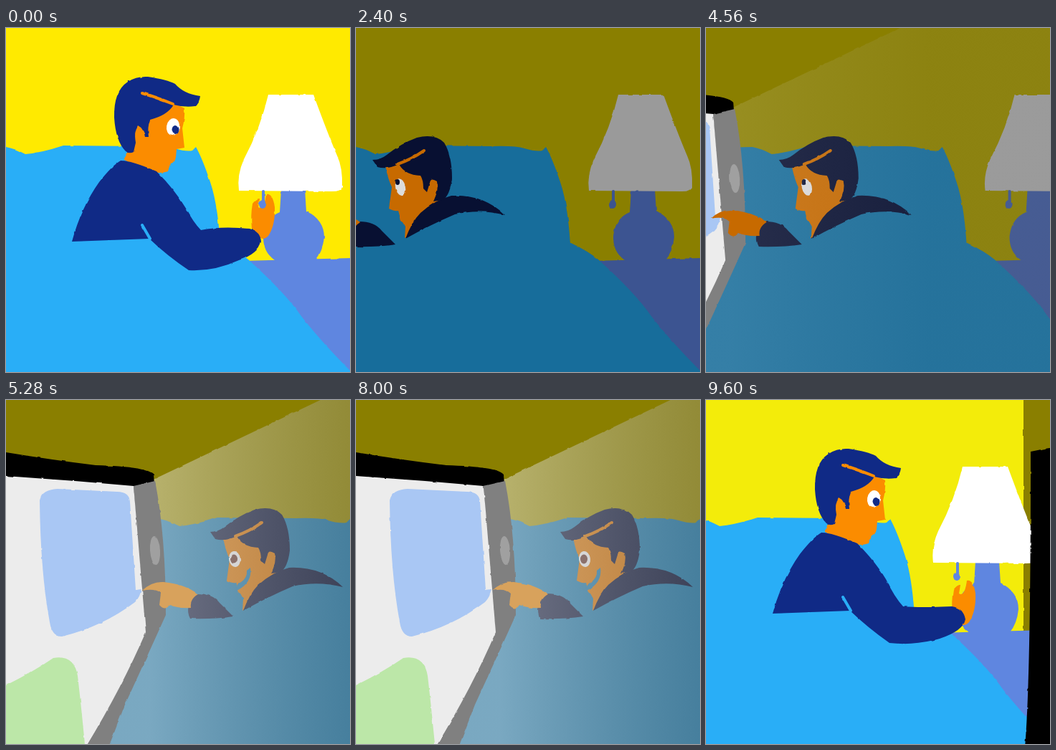
Animation, 480 px wide and 480 px high, one loop 9680 ms. Source, as an HTML page:

```html
<!DOCTYPE html>
<html lang="en">
<head>
<meta charset="utf-8">
<title>Lights out</title>
<style>
html, body { margin: 0; width: 100%; height: 100%; overflow: hidden; background: #8a7f00; }
svg { display: block; width: 100vw; height: 100vh; }
.lit { --wall: #ffea00; --bed: #29aef7; --navy: #102a86; --skin: #fb8c00; --shade: #fff; --base: #5f86e0; --eye: #fff; }
.dim { --wall: #8a7f00; --bed: #176d9b; --navy: #081032; --skin: #c76a00; --shade: #9a9a9a; --base: #3c5491; --eye: #dcdcdc; }
.wall { fill: var(--wall); }
.bed { fill: var(--bed); }
.navy { fill: var(--navy); }
.skin { fill: var(--skin); }
.shade { fill: var(--shade); }
.base { fill: var(--base); }
.eye { fill: var(--eye); }
.line { fill: none; stroke-width: 4; stroke-linecap: round; }
.line.skin { stroke: var(--skin); }
.line.bed { stroke: var(--bed); }
.line.base { stroke: var(--base); }
</style>
</head>
<body>
<svg viewBox="0 0 480 480" preserveAspectRatio="none">
  <defs>
    <filter id="boil" filterUnits="userSpaceOnUse" x="-10" y="-10" width="500" height="500" color-interpolation-filters="sRGB">
      <feTurbulence id="noise" type="fractalNoise" baseFrequency=".08" numOctaves="2" seed="1"/>
      <feDisplacementMap in="SourceGraphic" scale="2.5" xChannelSelector="R" yChannelSelector="G"/>
    </filter>
    <linearGradient id="beam" gradientUnits="userSpaceOnUse" x1="200" y1="0" x2="480" y2="0">
      <stop offset="0" stop-color="#eee" stop-opacity=".46"/>
      <stop offset="1" stop-color="#a2a2a2" stop-opacity=".34"/>
    </linearGradient>
  </defs>
  <g id="stage" filter="url(#boil)"></g>
</svg>
<script>
const LOOP = 9680, STEP = 80;
const $ = id => document.getElementById(id);
const path = (cls, d, id = '') => `<path id="${id}" class="${cls}" d="${d}"/>`;
const oval = (cls, x, y, rx, ry, turn = 0) =>
  `<ellipse class="${cls}" cx="${x}" cy="${y}" rx="${rx}" ry="${ry}" transform="rotate(${turn} ${x} ${y})"/>`;
const group = (id, body, cls = '') => `<g id="${id}" class="${cls}">${body}</g>`;

const room =
  path('base', 'M330 325L482 321V500H330Z') +
  path('base', 'M384 225H417L419 255Q444 268 444 292Q442 312 432 324H375Q358 312 359 290Q362 265 382 257Z') +
  path('shade', 'M366 93L429 93Q450 150 462 178Q470 195 469 222Q468 228 455 228L325 227Q322 205 332 183Q355 140 366 93Z') +
  path('bed', 'M-185 170L0 166Q12 168 27 176Q50 174 80 164L190 165Q222 164 235 168Q252 173 260 171L265 166Q274 182 285 215Q297 250 300 320H-185Z');

const blanket = path('bed', 'M-185 300H300Q325 312 338 323Q390 370 412 402Q440 438 482 480V500H-185Z');

const cord = path('line base', 'M359 228V244') + oval('base', 358, 246, 5, 6);

const armUp = 'M160 185Q175 185 210 200Q235 225 250 250Q262 272 272 282Q300 276 340 280Q355 284 356 298Q352 315 325 324Q290 340 255 338Q225 318 200 294L92 298Q105 250 130 215Q148 192 160 185Z';
const armDown = 'M160 185Q175 185 210 200Q235 225 250 250Q262 275 274 288Q300 290 342 288Q358 290 361 306Q358 322 325 333Q290 343 255 339Q225 318 200 294L92 298Q105 250 130 215Q148 192 160 185Z';

const upright = id =>
  group(id + 'Hand', path('skin', 'M343 280Q341 262 344 245Q350 237 354 238L352 250Q360 255 363 232Q372 230 375 250Q376 275 366 290Q358 298 352 290Z')) +
  path('skin', 'M176 150L190 100L235 105L249 112Q250 125 246 140L249 167L238 169L237 180Q236 188 229 190L226 200Q215 204 200 200L164 184L172 170Z') +
  path('navy', 'M151 125Q150 88 170 75Q182 67 198 68Q225 72 236 78Q248 92 271 95Q270 104 264 109Q248 111 234 107Q225 122 201 128Q197 138 199 152L194 152Q192 140 184 136Q178 145 181 160L178 173Q172 176 167 172Q153 158 151 125Z') +
  path('line skin', 'M190 91Q210 97 233 106') +
  oval('eye', 233, 138, 9, 12, 10) + oval('navy', 236, 142, 4.5, 6) +
  path('navy', armUp, id + 'Torso') +
  path('line bed', 'M190 275L201 294');

const turning =
  path('skin', 'M207 307L221 288Q235 277 245 280Q249 285 240 292Q228 297 216 306Z') +
  path('navy', 'M92 232Q95 210 125 207Q140 205 150 199L180 193Q190 160 215 150Q226 143 255 158L262 178Q280 186 284 195Q265 202 255 196L240 190L222 205L224 240L223 273L207 265Q215 275 223 290Q215 305 200 307Q175 307 150 290Q125 270 100 262Q92 250 92 232Z') +
  path('navy', 'M96 275Q100 265 112 267L125 277Z') +
  path('skin', 'M211 198Q220 186 221 205Q228 200 232 190L249 196L249 212L252 233L239 234L236 245L225 252L222 225Q211 215 211 198Z') +
  path('line skin', 'M225 159Q240 168 251 182') +
  path('line bed', 'M139 208Q160 209 184 212M146 223Q175 247 205 268') +
  oval('eye', 243, 208, 5, 8) + oval('navy', 243, 212, 4, 4);

const pointing = '<path d="M190 266Q203 253 220 254Q250 257 268 271Q256 278 258 290Q240 291 228 286Q222 295 214 286L216 270Q208 262 190 266Z"/>';

const lying =
  path('navy', 'M266 270Q288 270 298 283L317 302Q290 306 257 305Q248 288 266 270Z') +
  path('skin', 'M303 193Q307 212 312 222L308 252Q316 256 321 255L323 262Q322 268 327 270L331 277L330 294L380 245L379 200L340 180Z') +
  path('navy', 'M331 294Q340 270 352 258Q372 240 395 234Q440 232 470 261Q435 252 400 260Q365 275 331 294Z') +
  path('navy', 'M285 184Q296 184 305 177Q325 161 347 153Q372 147 385 160Q396 178 396 210Q393 234 383 240L370 242Q378 225 375 214Q366 208 365 216L361 229L356 224Q356 212 352 206Q330 205 322 190Q305 198 292 194Z') +
  path('line skin', 'M320 190Q340 183 357 171') +
  group('awake', oval('eye', 324, 222, 7, 12, -12) + oval('navy', 320, 215, 3, 4)) +
  group('happy', oval('eye', 319, 222, 8, 11, -8) + '<ellipse cx="318" cy="222" rx="5" ry="6.5" fill="#5c3028"/>' +
    path('bed', 'M341 234Q344 255 322 266Q320 258 328 254Q337 248 336 238Z'));

// Each phone part: [path, fill] facing the viewer, then turned away.
const phoneParts = [
  ['M-229 60Q-150 56 -80 62Q-40 64 0 73Q60 83 125 91Q198 93 206 104L207 118Q222 190 222 300Q195 360 165 425L140 490L-220 490Q-225 400 -229 60Z', 'rgb(0,0,0)',
   'M80 72Q120 62 165 64Q185 64 200 70Q245 82 280 88Q325 94 325 100L326 120Q330 230 333 340Q300 395 285 430L262 490L89 490Q94 400 80 72Z', 'rgb(0,0,0)'],
  ['M178 120L208 113Q223 190 223 300Q196 360 166 425L141 490L108 490Q160 405 192 325Z', 'rgb(128,128,128)',
   'M315 121L327 120Q331 230 334 340Q301 395 286 430L263 490L234 490Q262 440 323 305Z', 'rgb(52,52,52)'],
  ['M-82 96L0 106Q90 112 178 120L195 324Q160 405 108 490L-80 490Z', 'rgb(236,236,236)',
   'M167 110L215 112Q270 116 315 121L323 305Q262 430 234 490L165 490Z', 'rgb(226,226,226)'],
  ['M-82 96L-70 385L-80 490L-90 490Z', 'rgb(68,68,68)',
   'M166 110L175 385L164 490L164 490Z', 'rgb(68,68,68)'],
  ['M47 140Q50 125 72 124L155 128Q172 128 173 142L181 265L189 264Q187 275 180 282Q135 316 78 330Q64 330 61 310Q48 240 47 140Z', 'rgb(169,199,244)',
   'M240 140Q240 126 250 126L296 129Q310 132 313 150L317 265L323 267Q322 285 318 292Q290 310 268 316Q255 310 248 290Q238 220 240 140Z', 'rgb(115,164,239)'],
  ['M-30 420L0 398Q40 378 66 360Q95 355 100 385Q104 420 106 440L111 490L-30 490Z', 'rgb(188,231,168)',
   'M176 430L176 383Q205 345 240 337Q268 336 273 380Q274 410 270 425L232 490L176 490Z', 'rgb(138,212,104)'],
];

$('stage').innerHTML =
  group('night',
    '<rect id="nightWall" class="wall" x="0" y="-20" width="1000" height="520"/>' +
    group('nightRoom', room + blanket) + group('sitter', upright('sitter')) + group('nightCord', cord) +
    group('turner', turning) + group('sleeper', lying) +
    group('glow', '<path fill="url(#beam)" d="M195 116L695 -122L1000 500H100Z"/>'), 'dim') +
  group('day',
    '<rect id="dayWall" class="wall" x="-20" y="-20" width="520" height="520"/>' +
    group('dayRoom', room) + group('dayBlanket', blanket) +
    group('puller', upright('puller')) + group('dayCord', cord), 'lit') +
  group('phone', phoneParts.map(() => '<path/>').join('') +
    '<ellipse id="button" cx="208" cy="210" rx="7" ry="20" fill="#a0a0a0" transform="rotate(-4 208 210)"/>') +
  group('finger', pointing);

const phonePaths = [...$('phone').querySelectorAll('path')];
const show = (id, on) => { $(id).style.display = on ? '' : 'none'; };
const move = (id, x, y = 0) => $(id).setAttribute('transform', `translate(${x} ${y})`);
const ramp = (t, a, b) => Math.min(1, Math.max(0, (t - a) / (b - a)));
const ease = u => u * u * (3 - 2 * u);

// Blends every number of one string towards its partner in another.
function mix(a, b, u) {
  const to = b.match(/-?\d+/g);
  let i = 0;
  return a.replace(/-?\d+/g, n => +(+n + (to[i++] - n) * u).toFixed(1));
}

function track(keys, t) {
  let [t0, v0] = keys[0];
  for (const [t1, v1] of keys) {
    if (t <= t1) return t1 > t0 ? v0 + (v1 - v0) * ramp(t, t0, t1) : v1;
    [t0, v0] = [t1, v1];
  }
  return v0;
}

const nightX = [[8480, 0], [8720, 40], [8880, 99], [9600, 443], [LOOP, 480]];
const dayX = [[8480, -470], [8880, -335], [9200, -180], [9600, -8], [LOOP, 0]];
const phoneX = [[8880, 0], [9600, 373], [LOOP, 415]];
const LIGHT_OFF = 560, LIE_DOWN = 1200, SETTLE = 1520, WIPE = 8480;

function draw(t) {
  const wiping = t >= WIPE, lit = t < LIGHT_OFF;
  const pan = ease(ramp(t, 4240, 5120));
  const turn = ease(ramp(t, WIPE, 8880));
  const reach = lit ? 0 : ramp(t, 9200, 9600);
  const nx = track(nightX, t), px = track(phoneX, t);
  const dx = lit ? 0 : track(dayX, t);

  show('night', !lit);
  show('sitter', t < LIE_DOWN);
  show('turner', t >= LIE_DOWN && t < SETTLE);
  show('sleeper', t >= SETTLE);
  show('awake', t < 4800);
  show('happy', t >= 4800);
  move('nightWall', nx);
  move('nightRoom', nx + 215 * pan);
  move('nightCord', nx + 215 * pan);
  move('turner', 0, t < LIE_DOWN + STEP ? -25 : 0);
  const sleeperX = nx - 4 * turn + 262 * (pan - 1);
  move('sleeper', sleeperX);

  const phoneShift = 240 * (pan - 1) + px;
  move('glow', phoneShift + 120 * turn);
  $('glow').style.opacity = pan * (1 - .45 * turn);

  show('day', lit || wiping);
  $('dayWall').setAttribute('width', lit ? 520 : nx + 20);
  $('dayWall').style.fill = lit ? '' : '#f3ec0a';
  move('dayRoom', dx);
  move('dayCord', dx);
  move('dayBlanket', dx + 9 * reach);
  move('puller', dx + 9 * reach);
  move('pullerHand', 0, 20 * reach);
  $('pullerTorso').setAttribute('d', mix(armUp, armDown, reach));

  show('phone', pan > 0);
  $('phone').setAttribute('transform', `translate(${phoneShift} 72) skewX(${-2.4 * px / 373}) translate(0 -72)`);
  phoneParts.forEach(([d0, c0, d1, c1], i) => {
    phonePaths[i].setAttribute('d', mix(d0, d1, turn));
    phonePaths[i].setAttribute('fill', mix(c0, c1, turn));
  });
  $('button').style.opacity = 1 - turn;

  show('finger', t >= SETTLE);
  // The finger stays on the screen while the phone swings away.
  $('finger').setAttribute('transform', `translate(${sleeperX + 38 * turn} 0) translate(268 0) scale(${1 - .25 * turn} 1) translate(${-268 - 38 * turn} 0)`);
  $('finger').style.fill = mix(mix('rgb(199,106,0)', 'rgb(216,162,92)', pan), 'rgb(208,134,52)', turn);
  $('noise').setAttribute('seed', 1 + Math.floor(t / 160) % 4);
}

let last = -1;
function tick() {
  const t = Math.floor(performance.now() % LOOP / STEP) * STEP;
  if (t !== last) draw(last = t);
  requestAnimationFrame(tick);
}
tick();
</script>
</body>
</html>
```
